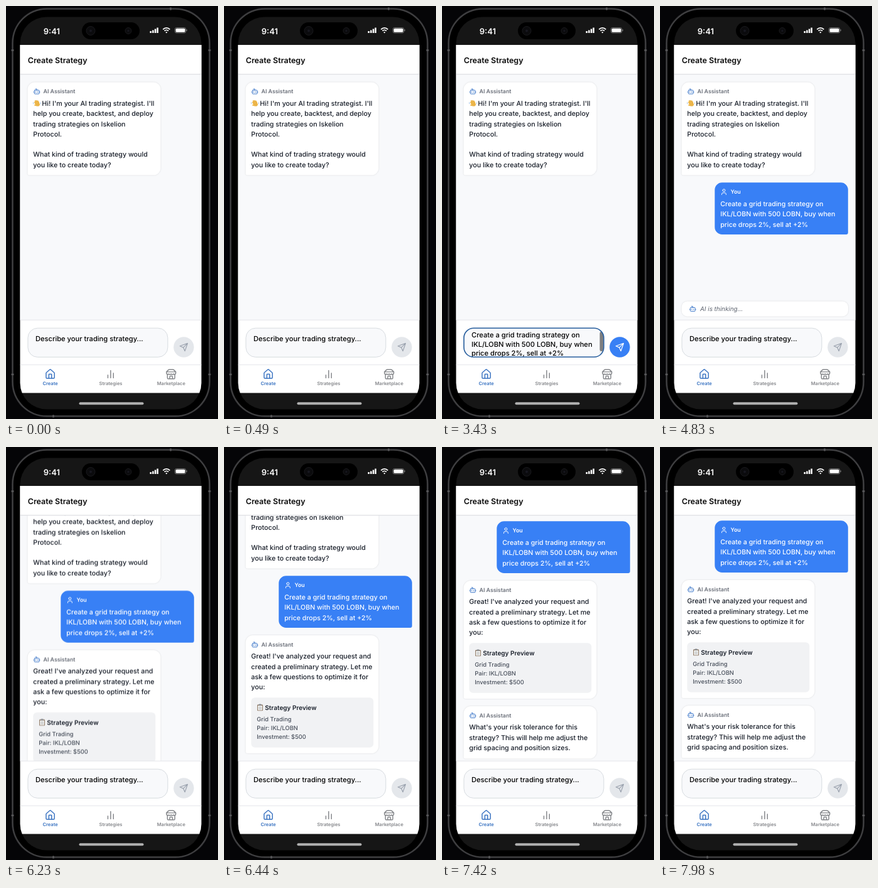
Animation of 338x658 px, one loop 8000 ms. Source, as an HTML page:

```html
<!DOCTYPE html>
<html lang="en">
<head>
<meta charset="utf-8">
<title>Create Strategy</title>
<style>
html, body { margin: 0; width: 100%; height: 100%; overflow: hidden; background: #050507; }
svg { display: block; width: 100%; height: 100%; font-family: Inter, Roboto, sans-serif; text-rendering: geometricPrecision; }
.icon { fill: none; stroke: currentColor; stroke-width: 2; stroke-linecap: round; stroke-linejoin: round; }
.title { font-size: 12.5px; font-weight: 600; fill: #0a0a0a; }
.body { font-size: 10.7px; font-weight: 450; fill: #171d28; }
.sent { fill: #fff; font-weight: 500; font-size: 10.6px; }
.who { font-size: 8.8px; font-weight: 600; fill: #696e78; }
.head { font-size: 10px; font-weight: 600; fill: #1b212c; }
.note { font-size: 9.35px; font-weight: 450; fill: #49505c; }
.field { font-size: 11.15px; font-weight: 450; fill: #000; }
.tab { font-size: 7.5px; font-weight: 600; text-anchor: middle; fill: currentColor; }
.card { filter: drop-shadow(0 .7px .8px rgba(0, 0, 0, .13)); }

/* One 8 s clock; 1% = 80 ms */
.ring, .caret, .caret2, .hint, .typed, .bar, .thumb, .fresh, .wait, .third, .fourth, .thread {
  animation: 8s step-end infinite;
}
.ring { animation-name: ring; animation-timing-function: linear; }
.caret { animation-name: caret; }
.caret2 { animation-name: caret2; }
.hint { animation-name: hint; }
.typed { animation-name: typed; }
.bar { animation-name: bar; animation-timing-function: linear; }
.thumb { animation-name: thumb; animation-timing-function: linear; transform-origin: 257px 0; }
.fresh { animation-name: fresh; }
.wait { animation-name: wait; }
.third { animation-name: third; }
.fourth { animation-name: fourth; }
.thread { animation-name: thread; animation-timing-function: linear; }

@keyframes ring { 0%, 16.62% { opacity: 0 } 19.25%, 55.9% { opacity: 1 } 58.62%, 100% { opacity: 0 } }
@keyframes caret { 0% { opacity: 0 } 17.5% { opacity: 1 } 25.375% { opacity: 0 } 31.5% { opacity: 1 } 35.875%, 100% { opacity: 0 } }
@keyframes caret2 { 0% { opacity: 0 } 35.875% { opacity: 1 } 42.875% { opacity: 0 } 49% { opacity: 1 } 56%, 100% { opacity: 0 } }
@keyframes hint { 0% { opacity: 1 } 35.875% { opacity: 0 } 56%, 100% { opacity: 1 } }
@keyframes typed { 0% { opacity: 0 } 35.875% { opacity: 1 } 56%, 100% { opacity: 0 } }
@keyframes bar { 0%, 35.87% { opacity: 0 } 35.875%, 50.4% { opacity: 1 } 53.375%, 100% { opacity: 0 } }
@keyframes thumb { 0%, 42.4% { transform: scaleX(.7) } 46.375%, 100% { transform: scaleX(1) } }
@keyframes fresh { 0% { opacity: 0 } 56%, 100% { opacity: 1 } }
@keyframes wait { 0% { opacity: 0 } 56% { opacity: 1 } 77%, 100% { opacity: 0 } }
@keyframes third { 0% { opacity: 0 } 77%, 100% { opacity: 1 } }
@keyframes fourth { 0% { opacity: 0 } 91%, 100% { opacity: 1 } }
@keyframes thread {
  0%, 76.6% { transform: translateY(0) }
  77% { transform: translateY(-9px) }
  77.875% { transform: translateY(-52px) }
  78.75% { transform: translateY(-74px) }
  80.5%, 90.6% { transform: translateY(-76px) }
  91% { transform: translateY(-88px) }
  91.875% { transform: translateY(-140px) }
  92.75% { transform: translateY(-163px) }
  94.5% { transform: translateY(-163.5px) }
  99.75%, 100% { transform: translateY(-164px) }
}
</style>
</head>
<body>
<svg viewBox="0 0 338 658">
  <defs>
    <clipPath id="screen"><rect x="22.5" y="17.5" width="289" height="625" rx="42"/></clipPath>
    <clipPath id="list"><path d="M22 109.5H312V500H22z"/></clipPath>
    <clipPath id="box"><rect x="35.5" y="514" width="222" height="45" rx="14"/></clipPath>
    <symbol id="bot" viewBox="0 0 24 24"><path class="icon" d="M12 8V4H8M6 8H18a2 2 0 0 1 2 2v8a2 2 0 0 1-2 2H6a2 2 0 0 1-2-2v-8a2 2 0 0 1 2-2zM2 14h2M20 14h2M15 13v2M9 13v2"/></symbol>
    <symbol id="user" viewBox="0 0 24 24"><path class="icon" d="M19 21v-2a4 4 0 0 0-4-4H9a4 4 0 0 0-4 4v2M8 7a4 4 0 1 1 8 0a4 4 0 1 1-8 0"/></symbol>
    <symbol id="send" viewBox="0 0 24 24"><path class="icon" d="M22 2 15 22 11 13 2 9zM22 2 11 13"/></symbol>
    <symbol id="home" viewBox="0 0 24 24"><path class="icon" d="M15 21v-8a1 1 0 0 0-1-1h-4a1 1 0 0 0-1 1v8M3 10a2 2 0 0 1 .7-1.5l7-6a2 2 0 0 1 2.6 0l7 6A2 2 0 0 1 21 10v9a2 2 0 0 1-2 2H5a2 2 0 0 1-2-2z"/></symbol>
    <symbol id="chart" viewBox="0 0 24 24"><path class="icon" d="M18 20V10M12 20V4M6 20v-6"/></symbol>
    <symbol id="shop" viewBox="0 0 24 24"><path class="icon" d="M2 7 6.4 2.6A2 2 0 0 1 7.8 2h8.4a2 2 0 0 1 1.4.6L22 7zM4 12v8a2 2 0 0 0 2 2h12a2 2 0 0 0 2-2v-8M15 22v-4a2 2 0 0 0-2-2h-2a2 2 0 0 0-2 2v4M2 7v3a2.7 2.7 0 0 0 5 1.3a2.7 2.7 0 0 0 5 0a2.7 2.7 0 0 0 5 0a2.7 2.7 0 0 0 5-1.3V7"/></symbol>
    <g id="by" color="#3b76c8">
      <use href="#bot" x="43.2" y="130.2" width="11.8" height="11.8"/>
      <text class="who" x="59.5" y="139.3">AI Assistant</text>
    </g>
  </defs>

  <!-- Phone shell -->
  <rect width="338" height="658" fill="#050507"/>
  <rect x="9" y="3" width="317" height="652" rx="56" fill="#2a2a2c"/>
  <rect x="10.7" y="4.7" width="313.6" height="648.6" rx="54.5" fill="#000" stroke="#414143" stroke-width="2"/>
  <path d="M8.500 70.5h4M322.500 70.5h4M8.500 587h4M322.500 587h4M262.5 2.500v4M75.500 651.500v4" stroke="#5a5a5c" stroke-width="2.500"/>

  <g clip-path="url(#screen)">
    <rect x="22" y="14" width="290" height="632" fill="#161616"/>
    <rect x="22" y="62" width="290" height="554.5" fill="#fff"/>
    <rect x="22" y="109" width="290" height="391" fill="#f8f9fb"/>

    <g clip-path="url(#list)">
      <g class="thread">
        <path class="card" fill="#fff" d="M46.5 121.5H235a11.5 11.5 0 0 1 11.5 11.5V258a11.5 11.5 0 0 1-11.5 11.5H37.5a3 3 0 0 1-3-3V133a11.5 11.5 0 0 1 12-11.5z"/>
        <use href="#by"/>
        <g transform="translate(49.7 155.2) rotate(-32)" stroke="#ecb548" stroke-width="1.75" stroke-linecap="round">
          <path d="M-2.4 0V-3.6M-.6-1V-5M1.2-1V-4.6M2.9 0V-3M-2.6 2.5-4.6.2"/>
          <path d="M-3-.8H3.2V2.2Q2.8 5 .2 5T-3 2z" fill="#ecb548" stroke="none"/>
          <path d="M-4.5-4.5-5.4-2.8M4.6 3.6 5.5 2" stroke="#8db4dc" stroke-width=".7"/>
        </g>
        <text class="body"><tspan x="57.3" y="159">Hi! I'm your AI trading strategist. I'll</tspan><tspan x="43.3" y="175.2">help you create, backtest, and deploy</tspan><tspan x="43.3" y="191.5">trading strategies on Iskelion</tspan><tspan x="43.3" y="207.7">Protocol.</tspan><tspan x="43.3" y="240.4">What kind of trading strategy would</tspan><tspan x="43.3" y="256.6">you like to create today?</tspan></text>

        <g class="fresh" color="#fff">
          <path fill="#3880f5" d="M99 281.3H288.3a11.5 11.5 0 0 1 11.5 11.5V361a3 3 0 0 1-3 3H99a11.7 11.7 0 0 1-11.7-11.7V293a11.7 11.7 0 0 1 11.7-11.7z"/>
          <use href="#user" x="96" y="290.3" width="11.8" height="11.8"/>
          <text class="who" x="112.5" y="299.3" style="fill:#fff">You</text>
          <text class="body sent"><tspan x="96.3" y="319">Create a grid trading strategy on</tspan><tspan x="96.3" y="335.2">IKL/LOBN with 500 LOBN, buy when</tspan><tspan x="96.3" y="351.5">price drops 2%, sell at +2%</tspan></text>
        </g>

        <g class="third">
          <path class="card" fill="#fff" d="M46.5 376H235a11.5 11.5 0 0 1 11.5 11.5V552.5a11.5 11.5 0 0 1-11.5 11.5H37.5a3 3 0 0 1-3-3V387.5a11.5 11.5 0 0 1 12-11.5z"/>
          <use href="#by" y="254.7"/>
          <text class="body"><tspan x="43.3" y="413.3">Great! I've analyzed your request and</tspan><tspan x="43.3" y="429.7">created a preliminary strategy. Let me</tspan><tspan x="43.3" y="446">ask a few questions to optimize it for</tspan><tspan x="43.3" y="462.2">you:</tspan></text>
          <rect x="43.3" y="475.3" width="195" height="79.5" rx="6" fill="#f1f2f4"/>
          <rect x="53" y="486.5" width="9" height="9.8" rx=".8" fill="#8f7a66"/>
          <path fill="#f4f4f2" d="M54 488h7v7.4h-7z"/>
          <path d="M55 490h5M55 491.7h5M55 493.4h5" stroke="#9a9ea2" stroke-width=".6"/>
          <rect x="55.5" y="485.5" width="4" height="2.2" rx=".6" fill="#8a8f96"/>
          <text class="head" x="65.3" y="494.6">Strategy Preview</text>
          <text class="note"><tspan x="52.3" y="513.2">Grid Trading</tspan><tspan x="52.3" y="527.3">Pair: IKL/LOBN</tspan><tspan x="52.3" y="541.3">Investment: $500</tspan></text>
        </g>

        <g class="fourth">
          <path class="card" fill="#fff" d="M46.5 576H235a11.5 11.5 0 0 1 11.5 11.5V648a11.5 11.5 0 0 1-11.5 11.5H37.5a3 3 0 0 1-3-3V587.5a11.5 11.5 0 0 1 12-11.5z"/>
          <use href="#by" y="454.5"/>
          <text class="body"><tspan x="43.3" y="613.4">What's your risk tolerance for this</tspan><tspan x="43.3" y="629.7">strategy? This will help me adjust the</tspan><tspan x="43.3" y="646">grid spacing and position sizes.</tspan></text>
        </g>
      </g>
      <g class="wait" color="#3b76c8">
        <rect class="card" x="34.5" y="470.5" width="265.5" height="24" rx="9" fill="#fff"/>
        <use href="#bot" x="46.3" y="476.5" width="11.8" height="11.8"/>
        <text x="64" y="486" font-size="9.9" font-style="italic" fill="#5f6570">AI is thinking...</text>
      </g>
    </g>

    <!-- Header -->
    <rect x="22" y="62" width="290" height="47" fill="#fff"/>
    <path d="M22 108.8H312" stroke="#d6d8dc"/>
    <text class="title" x="34.7" y="91">Create Strategy</text>

    <!-- Composer -->
    <path d="M22 500.3H312M22 571.7H312" stroke="#e2e4e8" stroke-width=".9"/>
    <rect x="34.9" y="513.2" width="223" height="46.2" rx="15.5" fill="#f8f9fb" stroke="#cfd3d9" stroke-width=".8"/>
    <text class="field hint" x="47" y="533.5">Describe your trading strategy...</text>
    <path class="caret" d="M47.3 522.5v14" stroke="#111" stroke-width=".9"/>
    <g clip-path="url(#box)">
      <text class="field typed"><tspan x="47" y="528.4">Create a grid trading strategy on</tspan><tspan x="47" y="542.5">IKL/LOBN with 500 LOBN, buy when</tspan><tspan x="47" y="556.6">price drops 2%, sell at +2%</tspan></text>
      <path class="caret2" d="M195 545.5v13" stroke="#111" stroke-width=".9"/>
      <g class="bar">
        <rect class="thumb" x="249" y="514" width="9" height="45" fill="#eeeff0"/>
        <rect class="thumb" x="249.5" y="519" width="7.5" height="31" rx="3" fill="#7d7e80"/>
      </g>
    </g>
    <rect class="ring" x="34.9" y="513.3" width="223" height="46" rx="15.5" fill="none" stroke="#285f9f" stroke-width="1.6"/>
    <g color="#9ca3af">
      <circle cx="283.4" cy="543.5" r="16.2" fill="#e4e7eb"/>
      <use href="#send" x="276" y="536.2" width="14.7" height="14.7"/>
    </g>
    <g class="typed" color="#fff">
      <circle cx="283.4" cy="543.5" r="16.2" fill="#3880f5"/>
      <use href="#send" x="276" y="536.2" width="14.7" height="14.7"/>
    </g>

    <!-- Tabs -->
    <g color="#3b74c2">
      <use href="#home" x="61.7" y="577.7" width="17.7" height="17.7"/>
      <text class="tab" x="70.6" y="604">Create</text>
    </g>
    <g color="#85878b">
      <use href="#chart" x="158" y="577.7" width="17.7" height="17.7"/>
      <text class="tab" x="167" y="604">Strategies</text>
      <use href="#shop" x="254.4" y="577.7" width="17.7" height="17.7"/>
      <text class="tab" x="263.3" y="604">Marketplace</text>
    </g>
    <rect x="116.5" y="631.2" width="103" height="4" rx="2" fill="#b0b0b0"/>

    <!-- Status bar -->
    <text x="59.7" y="44.5" font-size="13" font-weight="600" fill="#fff">9:41</text>
    <rect x="121" y="26" width="92" height="27" rx="13.5" fill="#000"/>
    <g fill="#0b0b0d" stroke="#1a1a1d">
      <circle cx="135" cy="39.5" r="7"/>
      <circle cx="195" cy="39.5" r="5"/>
    </g>
    <circle cx="135" cy="39.5" r="2" fill="#17171f"/>
    <circle cx="195" cy="39.5" r="1.5" fill="#17171f"/>
    <path d="M230.7 43v-3M234.4 43v-4.5M238.1 43v-6.5M241.6 43v-8.5" stroke="#fff" stroke-width="2.5"/>
    <g fill="none" stroke="#fff" stroke-width="1.8">
      <path d="M250.3 37.3a7.6 7.6 0 0 1 11 0M252.5 39.7a4.7 4.7 0 0 1 6.6 0"/>
      <path d="M255.8 43.4 254.3 41.8a2.1 2.1 0 0 1 3 0z" fill="#fff" stroke="none"/>
    </g>
    <rect x="269.3" y="34.5" width="17.5" height="8.5" rx="2.6" fill="none" stroke="#8a8a8a" stroke-width=".8"/>
    <rect x="270.6" y="35.8" width="14.9" height="5.9" rx="1.5" fill="#fff"/>
    <path d="M288 37.3v2.8" stroke="#8a8a8a" stroke-width="1.1"/>
  </g>
</svg>
</body>
</html>
```
